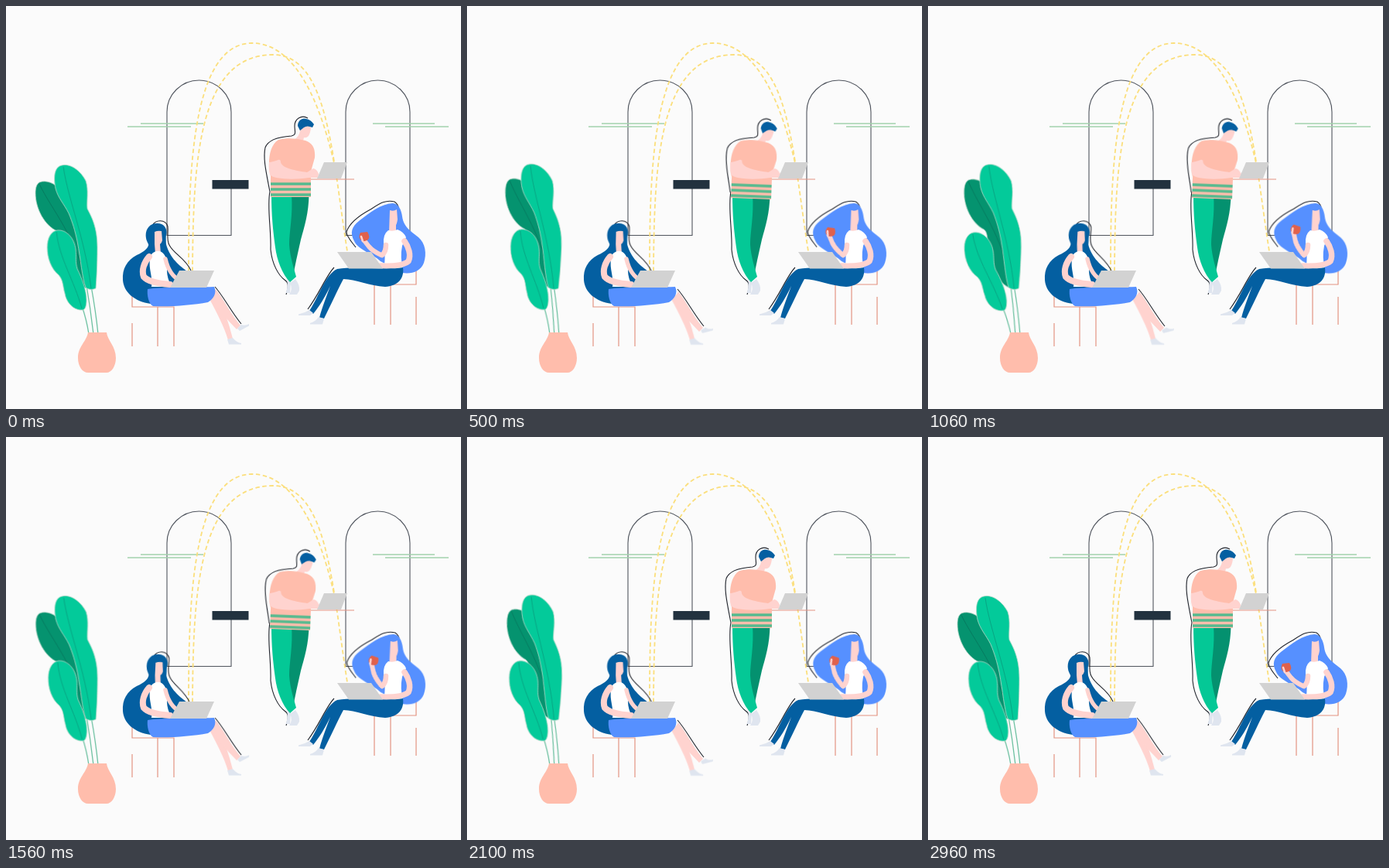
Recreate the animation shown at these times as an HTML page. Size 588 by 521 pixels, loop 3 s.

```html
<!DOCTYPE html>
<html lang="en">
<head>
<meta charset="utf-8">
<title>Working together</title>
<style>
  html, body { margin: 0; width: 100%; height: 100%; overflow: hidden; background: #fbfbfb; }
  svg { display: block; width: 588px; height: 521px; }
  .ink { fill: none; stroke: #20242c; stroke-width: 1.1; }
  .arch { fill: none; stroke: #50555e; stroke-width: 1.1; }
  .wire { fill: none; stroke: #fbdf7d; stroke-width: 1.8; stroke-dasharray: 5.5 3.5; }
  .air { stroke: #a3d2ad; stroke-width: 1.3; }
  .chair { fill: none; stroke: #e39482; stroke-width: 1.2; }
  .vein { fill: none; stroke: #08a583; stroke-width: 1; }
  .stem { fill: none; stroke: #6cc0a0; stroke-width: 1.3; }
  .leaf { fill: #03ca9a; stroke: #b9d8c8; stroke-width: .8; }
  .skin { fill: #ffd3cf; }
  .limb { fill: none; stroke: #ffd3cf; stroke-linecap: round; stroke-linejoin: round; }
  .navy { fill: #045fa1; }
  .blue { fill: #5690ff; }
  .white { fill: #fff; }
  .shoe { fill: #dfe5ef; }
  .laptop { fill: #d2d2d2; }
  .peach { fill: #ffbdac; }
</style>
</head>
<body>
<svg viewBox="0 0 588 521">
  <!-- room -->
  <path class="arch" d="M208 296.5V137A41.5 41 0 0 1 291 137V296.5Z"/>
  <path class="arch" d="M439 296.5V137A41.5 41 0 0 1 522 137V296.5Z"/>
  <path class="air" d="M174 152H255M157 156H239M474 152H554M490 156H572"/>
  <rect x="266.5" y="225" width="47" height="11.5" fill="#22323f"/>
  <path class="wire" d="M236 343C236 220 239 48 318 48C376 48 407 130 424 203"/>
  <path class="wire" d="M241 343C242 205 247 63 345 63C416 63 421 190 441 317"/>

  <!-- plant -->
  <g id="leafBack">
    <path class="stem" d="M103 355Q109 390 113 424"/>
    <path fill="#05936f" stroke="#b9d8c8" stroke-width=".8" d="M43 228C52 224 64 230 70 237C80 247 78 258 84 272C90 290 108 325 108 364C98 368 84 352 76 332C69 315 74 296 66 291C50 284 38 262 38 242C38 234 40 230 43 228Z"/>
    <path class="vein" style="stroke:#067a5f" d="M43 230C58 262 92 300 103 358"/>
  </g>
  <g id="leafTall">
    <path class="stem" d="M110 362Q116 395 119 424"/>
    <path class="leaf" d="M72 206C82 203 96 212 103 226C107 238 104 252 105 262C110 272 118 285 118 312C118 335 117 352 116 365C112 367 107 367 103 364C98 350 97 330 92 304C89 290 86 280 81 268C75 256 67 248 64 236C61 222 62 208 72 206Z"/>
    <path class="vein" d="M74 208C80 250 102 300 110 365"/>
  </g>
  <g id="leafFront">
    <path class="stem" d="M98 388Q104 405 107 424"/>
    <path class="leaf" d="M66 290C78 289 88 300 90 315C91 325 89 330 92 340C98 352 104 368 104 380C104 388 102 393 99 393C88 394 78 384 76 372C73 362 74 355 68 348C58 340 53 326 53 312C53 300 58 291 66 290Z"/>
    <path class="vein" d="M65 292C68 325 88 355 98 391"/>
  </g>
  <path class="peach" d="M106 422H130C131 432 142 440 142 455C142 466 136 474 130 474H106C99 474 93 466 93 455C93 440 104 434 106 422Z"/>

  <!-- woman on the left -->
  <path class="chair" d="M163 374V389H217V440M196 389V440M163 410V440"/>
  <g id="legFront">
    <path class="skin" d="M262 377L273 371C281 390 288 410 293 430L287 432C282 414 272 396 262 377Z"/>
    <path class="shoe" d="M286 431L293 429Q298 435 304 436V437.5H288Z"/>
  </g>
  <g id="legBack">
    <path class="ink" d="M270 363C281 375 290 394 304 411"/>
    <path class="skin" d="M264 378L271 366C282 380 291 399 303 413L298 418C286 406 275 393 264 378Z"/>
    <path id="toe" class="shoe" d="M299 417L304 412Q309 414 314 411V413.5L302 420Z"/>
  </g>
  <path class="navy" d="M184 300C188 312 178 318 169 322C156 329 150 340 151 354C152 370 166 382 187 385L214 364L234 343C222 334 210 324 206 304Z"/>
  <g id="head">
    <path class="ink" d="M189 284C193 276 206 275 209 285C210 294 207 302 211 309C217 321 232 326 239 342"/>
    <path class="navy" d="M181 300C179 289 186 280 196 281C205 281 209 289 207 296C206 302 208 306 205 314L184 318C188 310 182 307 181 300Z"/>
    <path class="skin" d="M192 292Q196 290 201 291L202 303Q201 307 199 308L200 320H193L192 308Z"/>
  </g>
  <path class="white" d="M190 319Q196 315 201 318C207 322 210 332 208 342Q208 352 214 363H188C190 350 184 340 186 328Q187 321 190 319Z"/>
  <path class="limb" stroke-width="8" d="M185 324C178 332 175 342 178 350Q185 358 212 360"/>
  <path class="limb" stroke-width="5.5" d="M206 327C209 340 215 350 225 355"/>
  <path class="blue" d="M183 366C200 363 240 364 269 363C273 371 268 379 261 383C240 387 212 389 190 388C184 385 182 373 183 366Z"/>
  <path class="laptop" d="M224 342H269L259 364H212Z"/>

  <!-- man -->
  <path class="ink" d="M341 240C337 260 343 290 342 315C344 334 352 348 360 354C366 358 365 364 362 373"/>
  <path class="shoe" d="M363 352L368 356L367 371H361.5Q365 362 363 352ZM367 358L374 353Q380 361 379 368L376 373H366Q371 366 367 358Z"/>
  <path fill="#04916f" d="M366 244H391.5C391 268 386 284 381 302C377 320 373 336 371 351L362 349C364 336 365 322 366 308Z"/>
  <path fill="#04c896" d="M343 244H369C371 270 366 292 366 308C367 325 372 338 375 350L367 357C357 347 350 328 348 312C345 290 343 270 343 244Z"/>
  <path class="chair" d="M392 224H450"/>
  <g id="torso">
    <path class="ink" d="M390 145C382 140 373 146 373 155C373 163 376 166 369 168C354 169 339 172 335 183C332 197 336 214 341 240"/>
    <g id="face">
      <path class="skin" d="M380 154L394 155Q394 163 391 168Q388 171 385 170L383 179L371 174Q380 168 380 160Z"/>
      <path class="navy" d="M377 155C377 148 383 144 388 146Q394 147 398 153L396 157Q389 154 385 157L380 161Z"/>
    </g>
    <path class="peach" d="M352 173C362 170 376 171 387 174C396 177 400 184 399 196L394 214V247H342V220C338 205 339 181 352 173Z"/>
    <path stroke="#55ba8f" stroke-width="3.4" d="M342 230H394M342 237H394M342 244H394"/>
  </g>
  <path id="arm" class="skin" d="M340 202C350 201 355 195 355 202C357 210 375 213 389 215L397 210Q402 211 404 217L403 222H391C372 225 345 224 341 218Q339 210 340 202Z"/>
  <path class="laptop" d="M411 202H441L433 223H402Z"/>

  <!-- woman on the right -->
  <path class="chair" d="M476 361V412M497 361V412M500 360H530V338M530 376V412"/>
  <g id="hair">
    <path class="ink" d="M452 312C446 304 440 298 440 292C444 280 458 270 471 263C482 256 490 250 502 253Q507 256 508 264"/>
    <path class="blue" d="M500 255C507 255 511 264 512 272C514 287 525 292 533 299C542 307 544 320 540 332C536 343 524 347 512 345L484 330C474 320 456 316 450 304C444 293 447 285 456 278C470 267 484 256 500 255Z"/>
    <path class="skin" d="M496 264Q501 266 505 263L506 276Q505 282 504 283V293H495Z"/>
  </g>
  <path class="white" d="M494 290Q500 292 506 289Q514 292 517 299L512 310Q509 325 513 340H488C491 326 489 318 488 308Q487 295 494 290Z"/>
  <path class="limb" stroke-width="7.5" d="M515 304C520 311 524 322 520 330Q512 337 484 336"/>
  <path class="limb" stroke-width="6.5" d="M491 309Q491 318 486 322"/>
  <g id="sip">
    <path class="limb" stroke-width="6" d="M485 322Q474 317 469 311L462 302"/>
    <path fill="#e0614c" d="M458 293L467 292Q471 298 468 302Q462 306 458 302Q455 298 458 293Z"/>
    <path class="limb" stroke-width="2.5" d="M459 298L461 304"/>
  </g>
  <path class="ink" d="M424 338C414 348 405 372 390 392"/>
  <path class="navy" d="M428 340C455 336 490 342 513 338C515 353 506 362 490 363C470 362 452 353 436 353C428 368 420 386 411 404L405 403C409 388 414 376 419 362C412 377 405 388 397 398L392 394C404 377 412 347 428 340Z"/>
  <path class="shoe" d="M392 393L397 397L393 400H378V398.5Q386 397 392 393ZM404 402L411 404L409 411.5H393V410Q400 408 404 402Z"/>
  <path class="laptop" d="M428 318H472L487 339.5H443Z"/>
</svg>
<script>
  const sine = 'cubic-bezier(.37, 0, .63, 1)';
  const pot = '112px 422px';

  // steps: [offset, amount]; pose(amount) gives the transform
  function move(id, origin, duration, delay, steps, pose) {
    const el = document.getElementById(id);
    el.style.transformOrigin = origin;
    const frames = steps.map(([offset, k]) => ({ offset, transform: pose(k), easing: sine }));
    el.animate(frames, { duration, delay, iterations: Infinity }).startTime = 0;
  }

  const swing = [[0, 0], [.5, 1], [1, 0]];
  const kick = [[0, 0], [.32, 1], [.7, 1], [1, 0]];
  const lean = [[0, 0], [.167, 1], [.52, 1], [.7, 0], [1, 0]];
  const nod = [[0, 0], [.35, 1], [.52, 1], [.83, 0], [1, 0]];
  const drink = [[0, 0], [.3, 1], [.667, 1], [.967, 0], [1, 0]];
  const shift = (x, y, a) => k => `translate(${x * k}px, ${y * k}px) rotate(${a * k}deg)`;

  move('leafBack', pot, 1500, -20, swing, shift(0, 0, 4.6));
  move('leafTall', pot, 1500, -60, swing, shift(0, 0, 2.5));
  move('leafFront', pot, 1500, -420, swing, k => `rotate(${-3.2 + 5.6 * k}deg)`);

  move('legFront', '266px 374px', 1500, 0, kick, shift(1.2, .4, 0));
  move('legBack', '268px 368px', 1500, 0, kick, shift(2, 3, 0));
  move('toe', '302px 417px', 1500, 0, kick, shift(1, 0, 14));
  move('head', '196px 318px', 3000, 0, nod, shift(0, 0, 3));

  move('torso', '342px 248px', 3000, 0, lean, shift(-1, 1, 2.2));
  move('face', '380px 172px', 3000, 0, lean, shift(-1, 1, 4));
  move('arm', '400px 220px', 3000, 0, lean, shift(.5, 0, 0));

  move('sip', '483px 322px', 3000, 0, drink, shift(-.5, -2.5, 26));
  move('hair', '500px 330px', 3000, 0, drink, shift(0, 0, .7));
</script>
</body>
</html>
```
